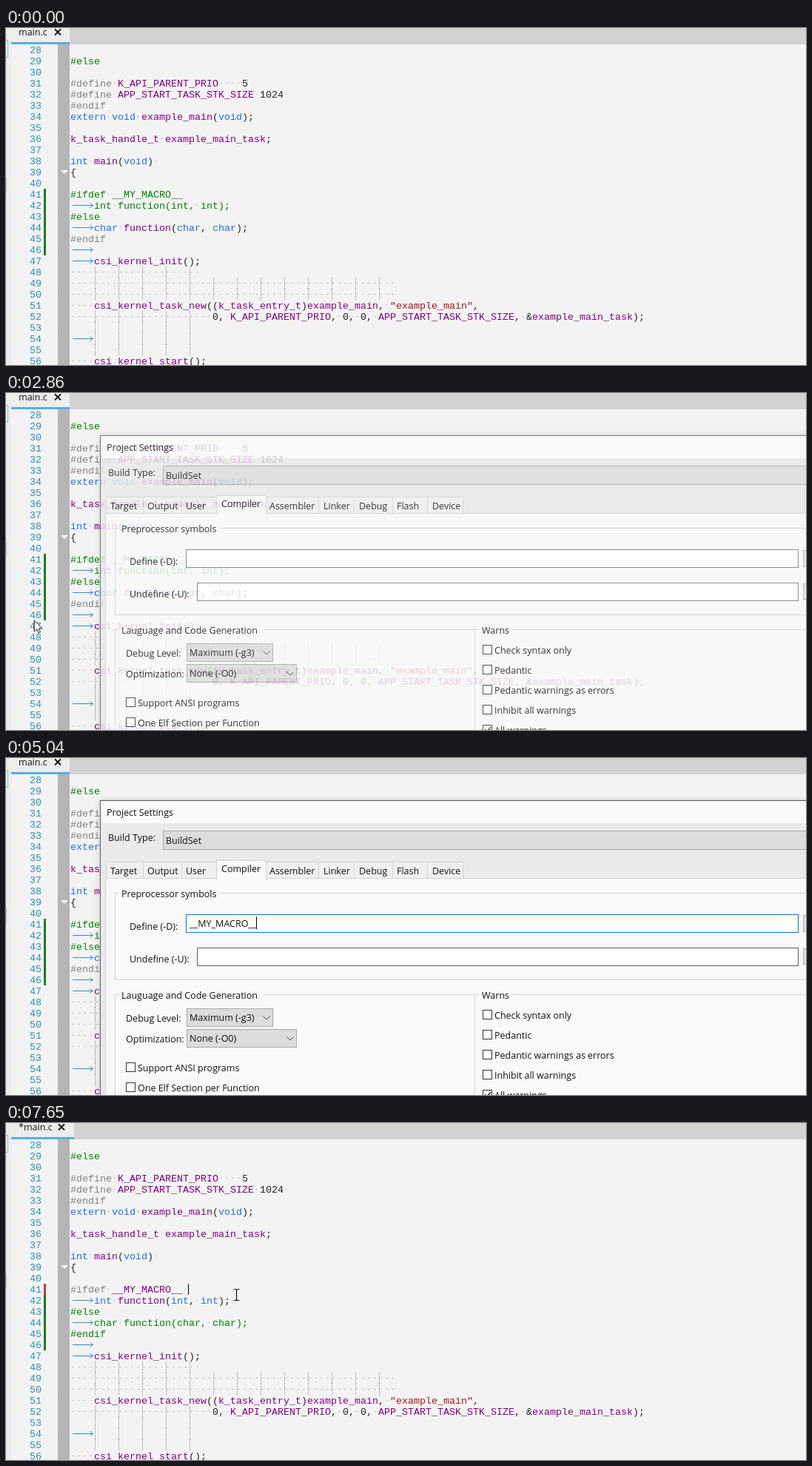
These frames come from a looping animation (1081x455 px, 8 s). An HTML page:

```html
<!DOCTYPE html>
<html lang="en">
<head>
<meta charset="utf-8">
<title>Project settings macro</title>
<style>
html, body { margin: 0; width: 100%; height: 100%; overflow: hidden; background: #f3f3f3; }
svg { display: block; }
text { white-space: pre; }
.code { font: 13.333px "Liberation Mono", monospace; }
.ui { font: 12.5px "Open Sans", sans-serif; fill: #111; }

/* 1% of the loop is 80 ms */
.flip { animation: 8s step-end infinite; }
.ease { animation: 8s linear infinite; }

.caret-start { animation-name: caret-start; }
@keyframes caret-start {
  0%, 19.75%, 32.25%, 81.25%, 100% { visibility: hidden; }
  13.25%, 25.75%, 78% { visibility: visible; }
}
.caret-click { animation-name: caret-click; }
@keyframes caret-click {
  0%, 88.25%, 100% { visibility: hidden; }
  81.25% { visibility: visible; }
}
.clean { animation-name: clean; }
@keyframes clean { 0% { visibility: visible; } 93.25%, 100% { visibility: hidden; } }
.edited { animation-name: edited; }
@keyframes edited { 0% { visibility: hidden; } 93.25%, 100% { visibility: visible; } }
.inactive { animation-name: inactive; }
@keyframes inactive { 0% { visibility: visible; } 94.4%, 100% { visibility: hidden; } }
.active { animation-name: active; }
@keyframes active { 0% { visibility: hidden; } 94.4%, 100% { visibility: visible; } }

.menu { animation-name: menu; }
@keyframes menu {
  0%, 24%, 33.2%, 100% { opacity: 0; }
  25.6%, 31% { opacity: 1; }
}
.dialog { animation-name: dialog; }
@keyframes dialog {
  0%, 34.6%, 72.1%, 100% { opacity: 0; }
  36%, 70.6% { opacity: 1; }
}
.focus { animation-name: focus; }
@keyframes focus { 0%, 45.4% { stroke: #7a7a7a; } 47%, 100% { stroke: #0078d7; } }
.hover { animation-name: hover; }
@keyframes hover { 0%, 54%, 65.5%, 100% { stroke: #7a7a7a; } 54.1%, 57% { stroke: #222; } }
.pasted { animation-name: pasted; }
@keyframes pasted { 0% { display: none; } 49.5%, 100% { display: inline; } }
.caret-field { animation-name: caret-field; }
@keyframes caret-field {
  0%, 56.25%, 68%, 100% { opacity: 0; }
  49.5%, 63% { opacity: 1; }
}

.mouse { animation-name: mouse; }
@keyframes mouse {
  0% { transform: translate(880px, 470px); }
  1.6% { transform: translate(876px, 452px); }
  8.75% { transform: translate(304px, 310px); }
  11.5% { transform: translate(356px, 288px); }
  13.25%, 17.25% { transform: translate(350px, 278px); }
  19.75% { transform: translate(95px, 245px); }
  34.9% { transform: translate(28px, 330px); }
  37.5% { transform: translate(57px, 259px); }
  44.4%, 53% { transform: translate(293px, 223px); }
  57.9% { transform: translate(338px, 385px); }
  77.9% { transform: translate(612px, 437px); }
  85.9%, 100% { transform: translate(311px, 232px); }
}
.beam { animation-name: beam; }
@keyframes beam {
  0%, 19.7%, 53.4%, 54.75% { visibility: hidden; }
  1.6%, 42.9%, 54%, 78%, 100% { visibility: visible; }
}
.arrow { animation-name: arrow; }
@keyframes arrow {
  0%, 42.9%, 54%, 58.7%, 100% { visibility: hidden; }
  35%, 53.4%, 54.75% { visibility: visible; }
}
</style>
</head>
<body>
<svg id="stage" width="1081" height="455" viewBox="0 0 1081 455">
  <defs>
    <pattern id="checker" width="2" height="2" patternUnits="userSpaceOnUse">
      <rect width="2" height="2" fill="#f4f4f4"/>
      <path d="M0 0h1v2h1v-1h-2z" fill="#767676" fill-rule="evenodd"/>
    </pattern>
    <filter id="shadow" x="-5%" y="-5%" width="110%" height="110%">
      <feDropShadow dx="0" dy="0" stdDeviation="4" flood-opacity=".18"/>
    </filter>
  </defs>
</svg>
<script>
const LEFT = 87, COL = 8, ROW = 15;
const rowTop = n => 22 + ROW * (n - 28);
const esc = s => s.replace(/&/g, '&amp;').replace(/</g, '&lt;');

const rect = (x, y, w, h, fill, extra = '') =>
  `<rect x="${x}" y="${y}" width="${w}" height="${h}" fill="${fill}" ${extra}/>`;
const box = (x, y, w, h, fill, stroke, extra = '') =>
  rect(x + .5, y + .5, w - 1, h - 1, fill, `stroke="${stroke}" ${extra}`);
const line = (d, stroke, extra = '') =>
  `<path d="${d}" fill="none" stroke="${stroke}" ${extra}/>`;
const group = (cls, body) => `<g class="${cls}">${body}</g>`;
const label = (x, mid, s) => `<text class="ui" x="${x}" y="${mid + 4.5}">${esc(s)}</text>`;

/* ---- Editor ---- */
const TOKENS = /(#\w+)|("[^"]*")|(\b(?:extern|void|int|char)\b)|([A-Za-z_]\w*)|([^\s\w"]+|\d+)/g;
const INK = ['#808080', '#a31515', '#1f6fe0', '#800080', '#222'];

const paint = (s, ink) => s.replace(TOKENS, (m, ...parts) => {
  const kind = parts.slice(0, 5).findIndex(p => p !== undefined);
  return `<tspan fill="${ink || INK[kind]}">${esc(m)}</tspan>`;
});

// one pixel in the middle of every space
const dots = (x, y, s) => [...s.matchAll(/ +/g)].map(m =>
  line(`M${x + COL * m.index + 3} ${y + 7.5}h${COL * m[0].length}`, '#808080', 'stroke-dasharray="1 7"')).join('');

function codeLine(n, s, ink) {
  const tab = s[0] === '\t', y = rowTop(n), mid = y + 7.5;
  const x = LEFT + (tab ? 4 * COL : 0);
  const text = s.replace('\t', '');
  const mark = tab ? line(`M90 ${mid}H117.5M113.5 ${mid - 3}l4 3l-4 3`, '#2b91c0') : '';
  return mark + dots(x, y, text) + `<text class="code" x="${x}" y="${y + 12}">${paint(text, ink)}</text>`;
}

function guides(n, last) {
  let d = '';
  for (let c = 4; c <= last; c += 4) d += `M${LEFT + c * COL + 1.5} ${rowTop(n)}v${ROW}`;
  return line(d, '#8a8a8a', 'stroke-dasharray="1 1"');
}

const GREEN = '#008000';
const source = {
  31: '#define K_API_PARENT_PRIO    5',
  32: '#define APP_START_TASK_STK_SIZE 1024 ',
  33: '#endif',
  34: 'extern void example_main(void);',
  36: 'k_task_handle_t example_main_task;',
  38: 'int main(void) ',
  39: '{',
  46: '\t',
  47: '\tcsi_kernel_init();',
  48: ' '.repeat(22),
  49: ' '.repeat(55),
  50: ' '.repeat(55),
  51: '    csi_kernel_task_new((k_task_entry_t)example_main, "example_main",',
  52: ' '.repeat(24) + '0, K_API_PARENT_PRIO, 0, 0, APP_START_TASK_STK_SIZE, &example_main_task);',
  54: '\t',
  56: '    csi_kernel_start();'
};
const branch = {
  41: '#ifdef __MY_MACRO__',
  42: '\tint function(int, int);',
  43: '#else',
  44: '\tchar function(char, char);',
  45: '#endif'
};
const branchLines = green => Object.keys(branch)
  .map(n => codeLine(n, branch[n], green.includes(+n) && GREEN)).join('');

const tab = (w, name, x, close) =>
  rect(7, 0, w, 20, '#ededed') + rect(7, 19, w, 3, '#56b0dc') + label(x, 5.5, name) +
  line(`M${close} 1.5l8 8m0 -8l-8 8`, '#111', 'stroke-width="1.8"');

function editor() {
  let s = rect(0, 0, 1081, 455, '#f3f3f3') + rect(0, 0, 7, 455, '#ececec') +
    rect(7, 0, 1074, 22, '#d2d2d2') +
    box(-3, 16, 6, 24, '#e4eeee', '#a5bcbc') + rect(0, 202, 1, 20, '#bdbdbd');
  s += group('flip clean', tab(79, 'main.c', 17, 66));
  s += group('flip edited', tab(85, '*main.c', 17, 71));
  s += rect(70, 22, 16, 433, 'url(#checker)') +
    '<path d="M74 192h10l-5 5z" fill="#fff"/>' + rect(51, 217, 3, 90, '#1b7d1b');
  s += group('flip edited', rect(51, 217, 3, 15, '#d8343c'));
  for (let n = 28; n <= 56; n++)
    s += `<text class="code" x="32" y="${rowTop(n) + 12}" fill="#2b91af">${n}</text>`;

  s += codeLine(29, '#else', GREEN);
  for (const n in source) s += codeLine(n, source[n]);
  for (const n of [48, 52, 53, 54, 55]) s += guides(n, 20);
  for (const n of [49, 50]) s += guides(n, 52);

  s += group('flip inactive', branchLines([41, 42, 43]));
  s += group('flip active', branchLines([43, 44, 45]));
  s += group('flip edited', dots(239, 217, ' ') + rect(246, 217, 1, 15, '#000'));
  s += group('flip caret-start', rect(87, 202, 1, 15, '#000'));
  s += group('flip caret-click', rect(238, 217, 1, 15, '#000'));
  return s;
}

/* ---- Dialog ---- */
const combo = (x, y, w, h, s, chevron) =>
  box(x, y, w, h, '#dcdcdc', '#a8a8a8') + label(x + 4, y + h / 2, s) +
  (chevron ? line(`M${chevron - 4.5} ${y + 10.5}l4.5 4.5l4.5 -4.5`, '#444') : '');

const check = (x, mid, s, on) =>
  box(x, mid - 7, 13, 13, '#fff', '#333') + label(x + 16, mid, s) +
  (on ? line(`M${x + 3} ${mid - 1}l3 3l5 -6`, '#222', 'stroke-width="1.4"') : '');

function dialog() {
  const edge = '#d4d4d4', page = '#f9f9f9';
  let s = rect(127, 57, 1000, 450, '#f0f0f0', 'filter="url(#shadow)"') +
    box(127, 57, 1000, 450, '#eaeaea', '#5a5a5a') + rect(128, 58, 960, 30, '#fafafa');
  s += label(136, 73, 'Project Settings') + label(138, 107, 'Build Type:') +
    combo(212, 98, 900, 26, 'BuildSet');

  s += box(134, 162, 990, 330, page, edge);
  const tabs = [['Target', 135, 141], ['Output', 185, 191], ['User', 237, 243], ['Compiler', 284, 291],
    ['Assembler', 351, 356], ['Linker', 422, 429], ['Debug', 470, 477], ['Flash', 522, 528], ['Device', 569, 576]];
  tabs.forEach(([name, x, tx], i) => {
    const w = (tabs[i + 1] || [0, 617])[1] - x + 1;
    if (name === 'Compiler')
      s += box(x, 138, w, 27, page, edge) + rect(x + 1, 162, w - 2, 4, page) + label(tx, 149.5, name);
    else s += box(x, 140, w, 23, '#f0f0f0', edge) + label(tx, 152, name);
  });

  s += line('M152 182.5H147.5V299.5H1081M290 182.5H1081', edge) + label(156, 183, 'Preprocessor symbols') +
    label(167, 227, 'Define (-D):') + label(167, 271.5, 'Undefine (-U):') +
    box(243, 211, 828, 25, '#fff', '#7a7a7a', 'class="ease focus"') +
    box(258, 256, 813, 25, '#fff', '#7a7a7a', 'class="ease hover"') +
    box(1077, 212, 30, 23, '#e1e1e1', '#adadad') + box(1077, 257, 30, 22, '#e1e1e1', '#adadad');
  s += group('flip pasted', label(248, 223, '__MY_MACRO__'));
  s += group('flip caret-field', rect(338, 214, 1, 17, '#000'));

  s += line('M152 319.5H147.5V455M347 319.5H639M633.5 319.5V455M684 319.5H1081', edge) +
    label(156, 320, 'Lauguage and Code Generation') + label(643, 320, 'Warns') +
    label(162, 351, 'Debug Level:') + combo(244, 338, 117, 25, 'Maximum (-g3)', 352) +
    label(162, 379, 'Optimization:') + combo(244, 366, 149, 25, 'None (-O0)', 384) +
    check(162, 418, 'Support ANSI programs') + check(162, 445, 'One Elf Section per Function');
  ['Check syntax only', 'Pedantic', 'Pedantic warnings as errors', 'Inhibit all warnings', 'All warnings']
    .forEach((name, i) => { s += check(644, 347 + 27 * i, name, i === 4); });
  return s;
}

/* ---- Pointer ---- */
const beam = line('M-3.5 -7.5H-1Q.5 -7.5 .5 -6V6Q.5 7.5 -1 7.5H-3.5M4.5 -7.5H2Q.5 -7.5 .5 -6M4.5 7.5H2Q.5 7.5 .5 6',
  '#111', 'stroke-width="1.2"');
const arrow = '<path d="M.5 .5V15.5L4 12.2L6.4 17.6L8.8 16.5L6.5 11.3H11.2Z" fill="#fff" stroke="#111"/>';

document.getElementById('stage').insertAdjacentHTML('beforeend',
  editor() +
  group('ease menu', box(-10, 212, 144, 260, '#f2f2f2', '#c4c4c4')) +
  group('ease dialog', dialog()) +
  group('ease mouse', group('flip beam', beam) + group('flip arrow', arrow)));
</script>
</body>
</html>
```
